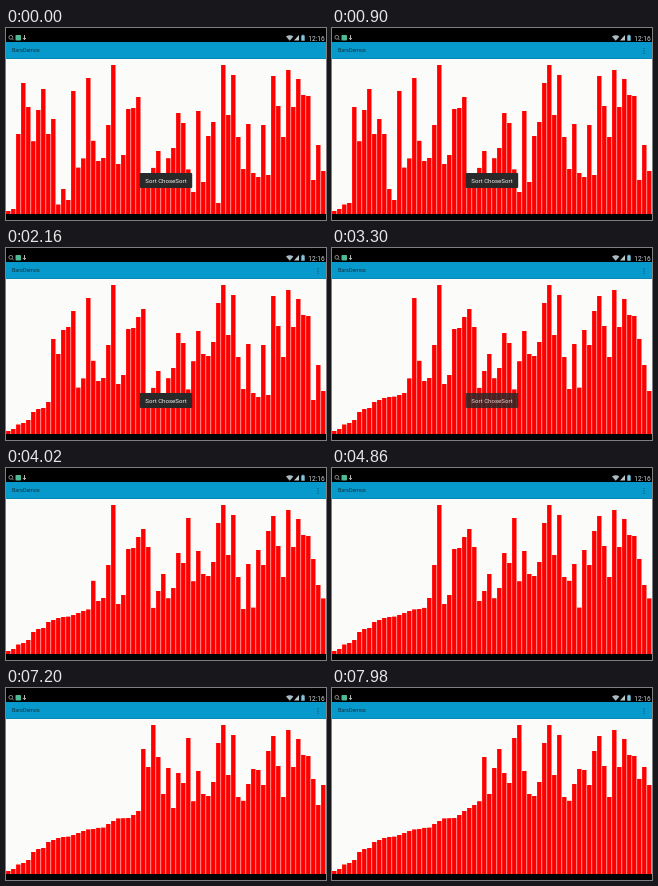
Recreate the animation shown at these times as an HTML page. Size 320 by 192 pixels, loop 8 s.

```html
<!DOCTYPE html>
<html lang="en">
<head>
<meta charset="utf-8">
<title>Selection sort</title>
<style>
  html, body { margin: 0; width: 100%; height: 100%; overflow: hidden; background: #000; }
  svg { display: block; width: 100%; height: 100%; }
  text { font-family: Roboto, sans-serif; }
</style>
</head>
<body>
<svg viewBox="0 0 320 192">
  <rect width="320" height="192" fill="#000"/>
  <rect y="14" width="320" height="17" fill="#0799cb"/>
  <rect y="30" width="320" height="1" fill="#0788b6"/>
  <rect y="31" width="320" height="155" fill="#fbfbf9"/>

  <g fill="none" stroke="#aaa" stroke-width=".8">
    <circle cx="4.8" cy="9.3" r="1.9"/>
    <path d="M6.2 10.7 7.8 12.3"/>
    <path d="M18.5 7v4.6M17 10l1.5 1.7L20 10" stroke="#ddd"/>
  </g>
  <rect x="9.5" y="7" width="5.5" height="5.5" rx=".8" fill="#4fb895"/>

  <path d="M280 8.6q3.7-2.6 7.4 0l-3.7 4.2z" fill="#a9bcc4"/>
  <path d="M293 7v5.6h-5z" fill="#b9c6cb"/>
  <path d="M295.3 7.6h1v-.8h1.4v.8h1v5.2h-3.4z" fill="#7fc4dd"/>
  <text x="302.3" y="12.7" font-size="6.6" fill="#c8d2d6">12:16</text>

  <text x="6" y="24.3" font-size="5.4" fill="#10323f">BarsDemos</text>
  <g id="menu" fill="#18586f">
    <rect x="311.3" y="20" width="1.2" height="1.2"/>
    <rect x="311.3" y="22.4" width="1.2" height="1.2"/>
    <rect x="311.3" y="24.8" width="1.2" height="1.2"/>
  </g>

  <g id="bars" fill="#f00"></g>

  <g id="toast">
    <rect x="133.8" y="145" width="52.4" height="15" rx="1" fill="#292929"/>
    <text x="160" y="154.7" font-size="6.1" fill="#eee" text-anchor="middle">Sort ChoseSort</text>
  </g>
</svg>
<script>
  const LOOP = 8000, BOTTOM = 186, PITCH = 5;
  const start = [
    183, 181, 106, 55, 79, 113.2, 82, 61, 106, 91, 176.5, 161, 172, 63, 139.6, 130.4,
    50, 112.8, 133, 130, 97, 37, 136, 127, 81, 80, 69, 160, 148.6, 139.9, 123, 150,
    130.2, 120, 85, 95, 141.4, 164, 83, 154, 108, 94, 175, 37, 87, 47, 109, 141,
    96, 145, 149, 97, 147, 48, 78, 109, 42, 79, 51, 67, 68, 152, 117, 143
  ];
  // Time in ms and number of finished passes
  const pace = [[0, 2], [900, 4.3], [2160, 9.5], [3300, 15.2], [4860, 19.4], [6420, 24.5], [8000, 30.3]];

  const $ = id => document.getElementById(id);
  const clamp = v => Math.min(1, Math.max(0, v));

  // The shortest bar has the largest top coordinate
  function pass(list, i) {
    const next = list.slice();
    let low = i;
    for (let j = i + 1; j < next.length; j++) if (next[j] > next[low]) low = j;
    [next[i], next[low]] = [next[low], next[i]];
    return next;
  }

  const states = [start];
  for (let i = 0; i < 31; i++) states.push(pass(states[i], i));

  const bars = start.map((_, i) => {
    const bar = document.createElementNS($('bars').namespaceURI, 'rect');
    bar.setAttribute('x', i * PITCH + 0.1);
    bar.setAttribute('width', 4.4);
    return $('bars').appendChild(bar);
  });

  function passesAt(t) {
    const k = pace.findIndex(p => t < p[0]);
    const [t0, n0] = pace[k - 1], [t1, n1] = pace[k];
    return Math.floor(n0 + (n1 - n0) * (t - t0) / (t1 - t0));
  }

  let shown = -1;
  function draw(t) {
    const n = passesAt(t);
    if (n !== shown) {
      states[n].forEach((top, i) => {
        bars[i].setAttribute('y', top);
        bars[i].setAttribute('height', BOTTOM - top);
      });
      shown = n;
    }
    $('menu').setAttribute('opacity', clamp((t - 100) / 300));
    $('toast').setAttribute('opacity', 1 - clamp((t - 3220) / 500));
  }

  const began = performance.now();
  function tick() {
    draw((performance.now() - began) % LOOP);
    requestAnimationFrame(tick);
  }
  tick();
</script>
</body>
</html>
```
